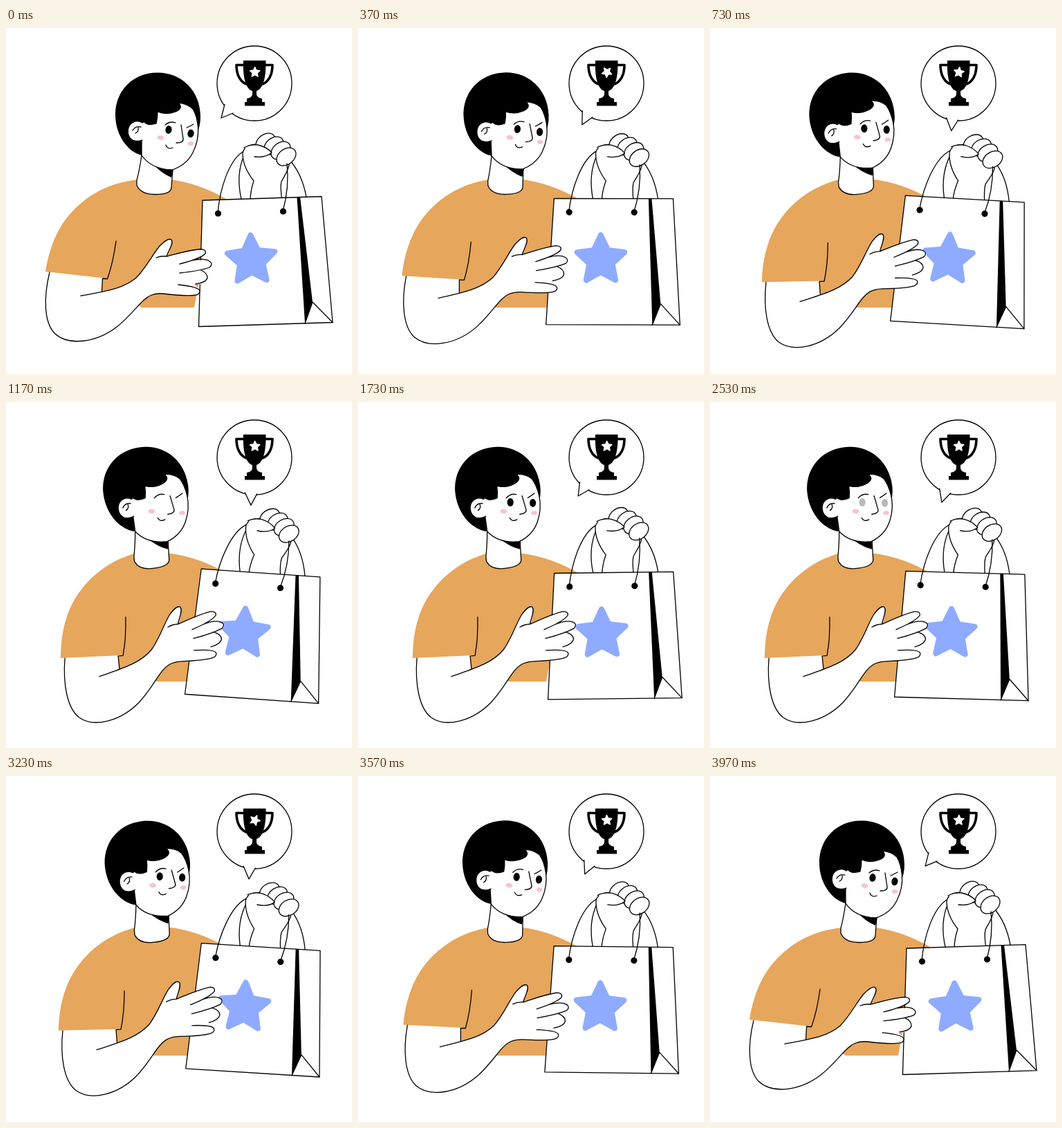
Animation, 500 px wide and 500 px high, one loop 4 s. Source, as an HTML page:

```html
<!DOCTYPE html>
<html lang="en">
<head>
<meta charset="utf-8">
<title>Shopping reward</title>
<style>
  html, body { margin: 0; width: 100%; height: 100%; overflow: hidden; background: #fff; }
  svg { display: block; width: 100vw; height: 100vh; }
  .line { fill: none; stroke: #000; stroke-width: 1.3; stroke-linecap: round; stroke-linejoin: round; }
  .paper { fill: #fff; stroke: #000; stroke-width: 1.3; stroke-linejoin: round; stroke-linecap: round; }
  .shirt { fill: #e6a65c; }
  .cheek { fill: #f4c5ce; }
</style>
</head>
<body>
<svg viewBox="0 0 500 500">
  <!-- shirt -->
  <path class="shirt" d="M185 220L239 219Q280 225 318 247L292 260L288 310Q281 360 272 404H196L170 385V250Z"/>
  <g class="arm">
    <path class="shirt" d="M192 219C146 223 106 246 81 284C67 306 60 332 57 352L146 362L139 363L138 385L190 365L200 300V225Z"/>
  </g>

  <!-- head and neck -->
  <g id="head">
    <path d="M196 184C176 179 158 155 158 125C158 92 182 64.500 219 64.500C255 64.500 281 92 281 128Q281 142 276 152L220 170Z"/>
    <path class="paper" d="M196 184Q193 205 189 220V227Q194 240 214 240.500Q239 241 239 230L241 204"/>
    <path d="M212 196Q226 206 242 204L239 216Q224 210 212 196Z"/>
    <path class="paper" d="M270 117Q262 109 249 108Q257 116 245 121Q232 126 219 121Q219 130 217 138Q205 142 199 135L196 140V184Q210 204 240 205Q261 198 270 180Q279 162 277.500 143Q276 127 270 117Z"/>
    <path fill="#fff" d="M199 138C193 133 184 134 179 140C174 148 176 158 183 162Q190 165 199 161Z"/>
    <path class="line" d="M197 137C191 133 184 134 179 140C174 148 176 158 183 162Q190 165 197 162M183 148Q187 141 195 143M187 152Q192 150 191 144"/>
    <ellipse class="cheek" cx="223.500" cy="158.500" rx="5" ry="3.400" transform="rotate(10 223.500 158.500)"/>
    <ellipse class="cheek" cx="267" cy="167" rx="4.200" ry="3"/>
    <g id="eyes">
      <ellipse cx="235" cy="147" rx="4.600" ry="5.900" transform="rotate(8 235 147)"/>
      <ellipse cx="267" cy="152.500" rx="4.600" ry="5.900" transform="rotate(8 267 152.500)"/>
    </g>
    <path class="line" d="M230 140Q237 134 245 137M261 144Q266 142 271 139M253 140L256 160Q257 166 246 166M231 169Q233 176 241 173"/>
  </g>

  <!-- speech bubble -->
  <circle class="paper" cx="359" cy="80" r="54"/>
  <path id="tail" class="paper" d="M316 110.500L311 130L328 123"/>
  <path d="M343 47H375.500C376 70 372 88 362 91V96Q363 101 370 102V107H374V112.500H345V107H348V102Q355 101 356 96V91C346 88 342 70 343 47Z"/>
  <path fill="none" stroke="#000" stroke-width="3.600" stroke-linejoin="round" d="M344 53.500H333C333 67 338 79 350 82M374 53.500H385C385 67 380 79 368 82"/>
  <polygon id="badge" fill="#fff" stroke="#fff" stroke-width="1.500" stroke-linejoin="round"/>

  <!-- raised hand with bag -->
  <g id="bag">
    <path class="line" d="M340 247Q332 212 344 184M434 244Q428 212 411 192"/>
    <path class="paper" d="M353 250C353 238 355 230 358 221C347 207 342 195 342 181Q344 169 362 168L390 165L409 198C407 208 402 214 398 222Q396 230 399 250"/>
    <g id="fingers"></g>
    <path fill="#fff" d="M345 173Q352 168 364 169Q381 173 384 180Q375 188 361 187Z"/>
    <path class="line" d="M344 173Q352 168 364 169Q377 172 384 180Q375 188 359 186"/>
    <path class="paper" d="M284 249L456 243.500L472 425.500L278.500 431.500Z"/>
    <path d="M420.500 244.500L425 244.300L443 396L432 427Z"/>
    <path class="line" d="M432 427L443 396L472 425.500"/>
    <polygon id="star" fill="#8eabff" stroke="#8eabff" stroke-width="8" stroke-linejoin="round"/>
    <path class="line" d="M306 268C309 232 322 192 342 179M400 265C407 240 408 215 406 196"/>
    <circle cx="306.500" cy="268" r="4.600"/>
    <circle cx="400.500" cy="265" r="4.600"/>
  </g>

  <!-- forearm -->
  <g class="arm">
    <path fill="#fff" d="M63 353C54 390 55 425 70 441C90 460 130 455 160 432C185 412 195 392 210 386Q218 383 228 384Q262 388 275 386Q286 380 272 371Q289 371 291 362Q290 354 282 350Q298 347 298 341Q294 334 270 336Q294 326 288 321Q281 318 232 330Q243 311 239 306C235 303 229 308 222 315C212 327 202 347 188 361C170 375 155 378 138 381L139 362Z"/>
    <path class="line" d="M63 353C54 390 55 425 70 441C90 460 130 455 160 432C185 412 195 392 210 386Q218 383 228 384Q262 388 274 386Q280 385 280 380Q279 374 249 371
      M108 387C140 381 168 378 188 361C202 347 212 327 222 315C229 308 235 303 239 306C243 311 234 323 232 330
      M217 332Q224 329 232 330C248 326 264 321 281 319.500Q290 320 288 326Q282 333 251 341
      M268 336Q286 332 294 337Q300 341 294 346Q280 351 251 354
      M282 350Q291 354 291 361Q289 368 274 370
      M159 308C156 330 151 350 146.500 362.500L139.500 362L138.500 380"/>
  </g>
</svg>
<script>
  const $ = id => document.getElementById(id);
  const arms = document.querySelectorAll('.arm');

  function star(id, x, y, outer, inner, tilt) {
    const pts = Array.from({ length: 10 }, (_, i) => {
      const a = (i * 36 - 90 + tilt) * Math.PI / 180, r = i % 2 ? inner : outer;
      return [x + r * Math.cos(a), y + r * Math.sin(a)];
    });
    $(id).setAttribute('points', pts.join(' '));
  }
  star('star', 354.5, 335.5, 36, 17.5, -2);
  star('badge', 359.7, 64, 7.5, 3.6, 0);

  $('fingers').innerHTML = [[375, 165], [387, 170], [397, 177], [405, 186]].map(([x, y]) =>
    `<ellipse class="paper" cx="${x}" cy="${y}" rx="15.500" ry="11" transform="rotate(-38 ${x} ${y})"/>`).join('');

  const clamp = x => Math.max(0, Math.min(1, x));
  const ease = x => x * x * (3 - 2 * x);
  const turn = (el, angle, x, y) => el.setAttribute('transform', `rotate(${angle} ${x} ${y})`);
  // Eye opacity around one blink
  const blink = (t, mid) => clamp((Math.abs(t - mid) - 50) / 70);

  function draw(now) {
    const t = now % 4000;
    const swing = ease(1 - Math.abs(1 - t / 1000 % 2));
    const lean = ease(clamp(Math.min(t, 4000 - t) / 1000));
    turn($('bag'), 6.2 * swing, 361, 227);
    turn($('tail'), -43 * swing, 359, 80);
    turn($('badge'), 360 * lean, 359.7, 64);
    turn($('head'), -8 * lean, 213, 252);
    arms.forEach(arm => turn(arm, -9 * lean, 183, 221));
    $('eyes').setAttribute('opacity', Math.min(blink(t, 1170), blink(t, 2600)));
  }

  const start = performance.now();
  (function frame() {
    draw(performance.now() - start);
    requestAnimationFrame(frame);
  })();
</script>
</body>
</html>
```
